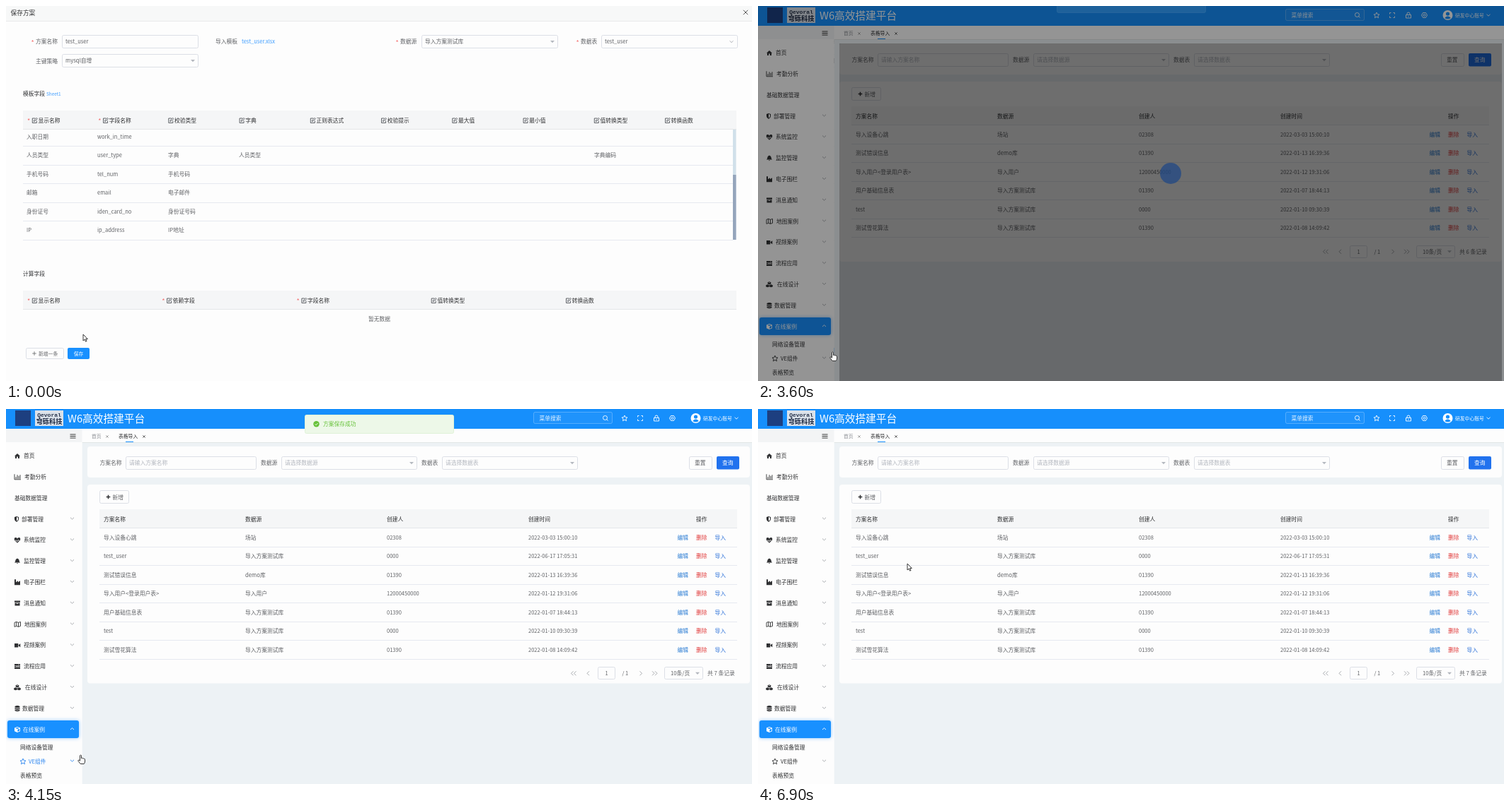
Animation, 1054 px wide and 531 px high, one loop 7000 ms. Source, as an HTML page with a canvas:

```html
<!DOCTYPE html>
<html lang="zh-CN">
<head>
<meta charset="utf-8">
<style>
html, body { margin: 0; width: 100%; height: 100%; overflow: hidden; background: #fdfdfd; }
canvas { display: block; }
</style>
</head>
<body>
<canvas id="stage" width="1054" height="531"></canvas>
<script>
const ctx = document.getElementById('stage').getContext('2d');
const FONT = '"Noto Sans CJK SC", "Noto Sans CJK", "Noto Sans", sans-serif';
const LOOP = 7000, PAGE_SWITCH = 3600, LOADED = 3900;
const INK = '#606266', DARK = '#303133', BLUE = '#1890ff', LINE = '#e6e9f0', BORDER = '#dcdfe6', PAPER = '#fdfdfd', HEAD = '#f5f6f7';

const clamp = v => Math.max(0, Math.min(1, v));
const easeOut = v => 1 - (1 - v) ** 2;

// y is the optical middle of the line of text
function text(s, x, y, color = INK, size = 0, weight = 400, align = 'left', family = FONT) {
  size = size || (/[^\x00-\xff]/.test(s) ? 7.75 : 7.5);
  ctx.font = `${weight} ${size}px ${family}`;
  ctx.textAlign = align;
  ctx.fillStyle = color;
  ctx.fillText(s, x, y + size * .38);
}

function rect(x1, y1, x2, y2, fill, radius = 0, stroke) {
  ctx.beginPath();
  const o = stroke ? .5 : 0;
  ctx.roundRect(x1 + o, y1 + o, x2 - x1 - 2 * o, y2 - y1 - 2 * o, radius);
  if (fill) { ctx.fillStyle = fill; ctx.fill(); }
  if (stroke) { ctx.strokeStyle = stroke; ctx.lineWidth = 1; ctx.stroke(); }
}

function circle(x, y, r, fill) {
  ctx.beginPath();
  ctx.arc(x, y, r, 0, 7);
  ctx.fillStyle = fill;
  ctx.fill();
}

// Strokes (or fills) an SVG path placed at x, y
function path(d, x, y, { stroke, fill, width = .9 }) {
  const shape = new Path2D(d);
  ctx.save();
  ctx.translate(x, y);
  if (fill) { ctx.fillStyle = fill; ctx.fill(shape, 'evenodd'); }
  if (stroke) { ctx.strokeStyle = stroke; ctx.lineWidth = width; ctx.stroke(shape); }
  ctx.restore();
}

const hline = (x1, x2, y, color = LINE) => rect(x1, y, x2, y + 1, color);
const chevron = (x, y, color = '#a8abb2', up = false) =>
  path(up ? 'M-2.5 1.2L0-1.2L2.5 1.2' : 'M-2.5-1.2L0 1.2L2.5-1.2', x, y, { stroke: color });
const triangle = (x, y) => path('M-3-1.5H3L0 1.7Z', x, y, { fill: '#b4b8bf' });
const cross = (x, y, r, color) => path(`M${-r} ${-r}L${r} ${r}M${r} ${-r}L${-r} ${r}`, x, y, { stroke: color });
const plus = (x, y, width, color) => path('M-2.8 0H2.8M0-2.8V2.8', x, y, { stroke: color, width });
const star = (x, y, color) => path('M0-4L1.2-1.3L4-1L1.9 .9L2.5 3.8L0 2.3L-2.5 3.8L-1.9 .9L-4-1L-1.2-1.3Z', x, y, { stroke: color });
const asterisk = (x, y) => text('*', x, y + 1, '#f56c6c', 9);

function field(x1, x2, y1, y2, value, color = INK, arrow) {
  rect(x1, y1, x2, y2, PAPER, 2, BORDER);
  text(value, x1 + 5, (y1 + y2) / 2, color);
  if (arrow) arrow(x2 - 8, (y1 + y2) / 2);
}

function editHeading(x, y, label, required) {
  if (required) { asterisk(x, y); x += 7; }
  path('M4 -3H0V3.5H6V.5M2 1.5L2.4-.2L5.8-3.6L7-2.4L3.6 1Z', x + .3, y, { stroke: '#505358' });
  text(label, x + 8.5, y, DARK, 0, 500);
}

const templateHeadings = ['显示名称', '字段名称', '校验类型', '字典', '正则表达式', '校验提示', '最大值', '最小值', '值转换类型', '转换函数'];
const templateRows = [
  ['入职日期', 'work_in_time'], ['人员类型', 'user_type', '字典', '人员类型', '字典编码'],
  ['手机号码', 'tel_num', '手机号码'], ['邮箱', 'email', '电子邮件'],
  ['身份证号', 'iden_card_no', '身份证号码'], ['IP', 'ip_address', 'IP地址']];
const computedHeadings = ['显示名称', '依赖字段', '字段名称', '值转换类型', '转换函数'];

function drawForm() {
  rect(0, 0, 1054, 531, PAPER);
  rect(0, 0, 1054, 21, '#f7f8f8');
  hline(0, 1054, 21, '#e9eaeb');
  text('保存方案', 6.5, 10, DARK, 8.7);
  cross(1045, 9, 3.2, '#444');

  for (const [x, label, required, y = 50.5] of [[42, '方案名称', 1], [296, '导入模板'], [557, '数据源', 1], [812, '数据表', 1], [42, '主键策略', 0, 78.5]]) {
    if (required) asterisk(x - 6.5, y);
    text(label, x, y);
  }
  field(79, 272, 41, 60, 'test_user');
  text('test_user.xlsx', 333, 50.5, '#409eff');
  field(587, 780, 41, 60, '导入方案测试库', INK, triangle);
  field(841, 1034, 41, 60, 'test_user', INK, (x, y) => chevron(x - 1, y));
  field(79, 272, 68, 87, 'mysql自增', INK, triangle);

  text('模板字段', 24, 124, DARK);
  text('Sheet1', 57, 124.5, '#409eff', 6.4);
  rect(24, 148, 1032, 175, HEAD);
  hline(24, 1032, 174, '#e4e6e8');
  templateHeadings.forEach((label, i) => editHeading(29 + 100.25 * i + (i < 2), 162, label, i < 2));
  templateRows.forEach((row, i) => {
    row.forEach((cell, j) => text(cell, [29, 129, 229, 329, 831][j], 185 + 26.5 * i));
    hline(24, 1027, Math.round(198 + 26.5 * i));
  });
  rect(1027, 175, 1031.5, 331, '#d1e0ea');
  rect(1027, 239, 1031.5, 331, '#95a5bc');

  text('计算字段', 24, 379, DARK);
  rect(24, 403, 1032, 430, HEAD);
  hline(24, 1032, 429, '#e4e6e8');
  computedHeadings.forEach((label, i) => editHeading(30 + 190.3 * i, 417, label, i < 3));
  text('暂无数据', 512, 443);

  rect(28, 484, 82, 500, PAPER, 2, BORDER);
  plus(40, 492, .8, INK);
  text('新增一条', 46, 492, INK, 6.8);
  rect(87, 484, 118, 500, BLUE, 2);
  text('保存', 95.8, 492, '#fff', 6.8, 500);
}

// Menu: label, text x, icon path, icon is outlined
const menu = [
  ['首页', 25, 'M-4 .3L0-3.5L4 .3H3V3.5H.9V1H-.9V3.5H-3V.3Z'],
  ['考勤分析', 26, 'M-4-4V3.5H5M-2 2.5V0M0 2.5V-3M2 2.5V-1.5M4 2.5V-3', 1],
  ['基础数据管理', 12],
  ['部署管理', 22, 'M-4-3L-1-4L2-3V0Q2 2.5-1 4Q-4 2.5-4 0ZM-1-2.8V2.5Q1 1.5 1 0V-2.2Z'],
  ['系统监控', 25, 'M0 4L-4 0Q-5-4-2-3.6Q-.5-3.4 0-2Q.5-3.4 2-3.6Q5-4 4 0ZM-3 0H-1L0 1.5L1-1L1.6 0H3V.7H1.3L.9 .4L0 2.8L-1.3 .7H-3Z'],
  ['监控管理', 25, 'M-4 2Q-2.5 .5-2.6-1.5Q-2-3.4 0-4Q2-3.4 2.6-1.5Q2.5 .5 4 2ZM-1 2.8H1Q0 4.5-1 2.8Z'],
  ['电子围栏', 25, 'M-4-4H-2V0L1-2V0L4-2V4H-4Z'],
  ['消息通知', 25, 'M-4-3.5H4V-1.3H-4ZM-3.5-.7H3.5V3.5H-3.5ZM-1.3 .2V1H1.3V.2Z'],
  ['地图案例', 26, 'M-4-2.5L-1.3-3.5L1.5-2.5L4.5-3.5V2.5L1.5 3.5L-1.3 2.5L-4 3.5ZM-1.3-3.5V2.5M1.5-2.5V3.5', 1],
  ['视频案例', 25, 'M-4-2.7H1.3V2.7H-4ZM1.8-.8L4.3-2.5V2.5L1.8 .8Z'],
  ['流程应用', 25, 'M-4-3.5H4V-1.5H-4ZM-4-.9H4V1H-4ZM-4 1.6H4V3.5H-4ZM1-2.8V-2.2H3V-2.8ZM-2-.2V.3H3V-.2Z'],
  ['在线设计', 27, 'M0-4L2.3-3V-.7L0 .3L-2.3-.7V-3ZM-2.4 0L-.2 1V3.2L-2.4 4L-4.8 3.2V1ZM2.4 0L4.8 1V3.2L2.4 4L.2 3.2V1ZM-1.2-2.5L0-2L1.2-2.5L0-3Z'],
  ['数据管理', 23, 'M-3.5-3Q0-5 3.5-3V-1.5Q0 0-3.5-1.5ZM-3.5-.8Q0 .8 3.5-.8V.9Q0 2.5-3.5 .9ZM-3.5 1.6Q0 3.2 3.5 1.6V3.2Q0 5-3.5 3.2Z'],
  ['在线案例', 24, 'M0-4L4-2.3V2.3L0 4L-4 2.3V-2.3ZM-2.8-2L0-.8L2.8-2L0-3ZM.4 0V3L3.2 1.7V-1.2Z']];

function drawSidebar(hovered) {
  rect(0, 28, 107.5, 531, PAPER);
  rect(0, 28, 107.5, 47, '#f3f4f5');
  path('M-4-2.5H4M-4 0H4M-4 2.5H4', 94.5, 38.5, { stroke: '#333', width: 1.2 });
  ctx.save();
  ctx.shadowColor = 'rgba(24,144,255,.5)';
  ctx.shadowBlur = 5;
  rect(2, 441, 103, 466, BLUE, 3);
  ctx.restore();
  menu.forEach(([label, x, icon, outlined], i) => {
    const y = 66.5 + 29.8 * i, active = i === 13, color = active ? '#fff' : DARK;
    if (icon) path(icon, 16, y, outlined ? { stroke: color } : { fill: color });
    text(label, x, y - .3, color);
    if (i > 2) chevron(93.5, y - 1, active ? '#fff' : '#a0a3a8', active);
  });
  const color = hovered ? '#2b85f0' : DARK;
  text('网络设备管理', 20, 479, DARK);
  star(24, 499, color);
  text('VE组件', 32, 499, color);
  chevron(93.5, 498, hovered ? '#2b85f0' : '#a0a3a8');
  text('表格预览', 20, 519, DARK);
}

function drawTopBar() {
  rect(0, 0, 1054, 28, '#168ffc');
  rect(13, 2, 35, 24, '#1d3f80');
  rect(41, 2, 81, 24, '#dbe2ea');
  text('Qevoral', 61, 8, '#26324a', 8, 700, 'center', '"Liberation Mono", monospace');
  text('穹砾科技', 61, 18, '#1b2740', 9.2, 700, 'center');
  text('W6高效搭建平台', 87, 13.5, '#fff', 14.7);
  rect(745, 4, 857, 21, 'rgba(255,255,255,.04)', 2, 'rgba(255,255,255,.25)');
  text('菜单搜索', 753.5, 13, '#e8f4ff');
  const white = { stroke: '#fff' };
  path('M3 0A3 3 0 1 1-3 0A3 3 0 1 1 3 0M2.2 2.2L4 4', 846.5, 12.5, white);
  star(874, 13, '#fff');
  path('M-3.5-1.5V-3.5H-1.5M1.5-3.5H3.5V-1.5M3.5 1.5V3.5H1.5M-1.5 3.5H-3.5V1.5', 896, 13, white);
  path('M-3.5-.5H3.5V4H-3.5ZM-2-.5V-2Q-2-4 0-4Q2-4 2-2V-.5M0 1V2.5', 919, 13, white);
  path('M-2-3.5H2L4 0L2 3.5H-2L-4 0ZM1.5 0A1.5 1.5 0 1 1-1.5 0A1.5 1.5 0 1 1 1.5 0', 941.5, 13, white);
  circle(974.5, 13, 7, '#fff');
  circle(974.5, 11, 2.6, '#168ffc');
  path('M-4.3 4Q0-.8 4.3 4Q0 7-4.3 4Z', 974.5, 13, { fill: '#168ffc' });
  text('研发中心账号', 985, 13, '#fff', 6.8);
  chevron(1032, 13, '#fff');

  rect(107.5, 28, 1054, 47, PAPER);
  hline(107.5, 1054, 47, '#e2e7e6');
  text('首页', 121, 38.5, '#8a8d93', 6.8);
  cross(143, 39, 1.7, '#999');
  text('表格导入', 159, 38.5, DARK, 6.8);
  cross(195, 39, 1.7, '#555');
  hline(169, 180, 46, BLUE);
}

const schemes = [
  ['导入设备心跳', '场站', '02308', '2022-03-03 15:00:10'],
  ['test_user', '导入方案测试库', '0000', '2022-06-17 17:05:31'],
  ['测试错误信息', 'demo库', '01390', '2022-01-13 16:39:36'],
  ['导入用户<登录用户表>', '导入用户', '12000450000', '2022-01-12 19:31:06'],
  ['用户基础信息表', '导入方案测试库', '01390', '2022-01-07 18:44:13'],
  ['test', '导入方案测试库', '0000', '2022-01-10 09:30:39'],
  ['测试雪花算法', '导入方案测试库', '01390', '2022-01-08 14:09:42']];

function drawList(rows) {
  const hint = '#b2b6be', columns = [138, 338, 538, 738, 975];
  rect(107.5, 48, 1054, 531, '#edf2f5');
  rect(115, 53, 1051, 97, PAPER, 4);
  text('方案名称', 132.5, 76.5);
  field(169, 354, 67, 86, '请输入方案名称', hint);
  text('数据源', 360, 76.5);
  field(389, 581, 67, 86, '请选择数据源', hint, triangle);
  text('数据表', 587, 76.5);
  field(616, 808, 67, 86, '请选择数据表', hint, triangle);
  rect(965, 67, 998, 86, PAPER, 2, BORDER);
  text('重置', 973, 76.5);
  rect(1004, 67, 1036, 85.5, '#2172ee', 2);
  text('查询', 1012, 76.5, '#fff');

  const pagerY = 188.5 + 26.5 * rows.length;
  rect(115, 107, 1051, pagerY + 14.5, PAPER, 4);
  rect(132, 115, 174, 134, PAPER, 2, BORDER);
  plus(144.5, 124.5, 1.5, DARK);
  text('新增', 150.5, 125);
  rect(132, 142, 1033, 168, HEAD);
  hline(132, 1033, 168, '#e4e7eb');
  ['方案名称', '数据源', '创建人', '创建时间', '操作'].forEach((s, i) => text(s, columns[i], 156, DARK, 0, 500));
  rows.forEach((row, i) => {
    const y = 182 + 26.5 * i;
    row.forEach((cell, j) => text(cell, columns[j], y));
    text('编辑', 948.5, y, '#2b7cd3');
    text('删除', 975, y, '#e03a3a');
    text('导入', 1001.5, y, '#2b70d8');
    hline(132, 1033, Math.round(y + 12.5));
  });

  const y = pagerY + .3, gray = { stroke: '#a0a3a8' };
  path('M0-3L-3 0L0 3M4-3L1 0L4 3', 801.5, y, gray);
  path('M1.5-3L-1.5 0L1.5 3', 822.5, y, gray);
  rect(836, Math.round(y - 9), 861, Math.round(y + 9), PAPER, 2, BORDER);
  text('1', 848.5, y, INK, 0, 400, 'center');
  text('/ 1', 870.5, y);
  path('M-1.5-3L1.5 0L-1.5 3', 897, y, gray);
  path('M-4-3L-1 0L-4 3M0-3L3 0L0 3', 917, y, gray);
  rect(930, Math.round(y - 9), 985, Math.round(y + 9), PAPER, 2, BORDER);
  text('10条/页', 939, y);
  triangle(977, y);
  text(`共 ${rows.length} 条记录`, 991, y);
}

// Loading veil over the content, and the dialog's fading veil over the whole page
function drawMasks(t) {
  if (t < LOADED) {
    rect(115, 53, 1051, 531, 'rgba(0,0,0,.26)');
    circle(583, 237, 15, 'rgba(62,126,222,.8)');
  }
  const dim = .42 * clamp(1 - (t - PAGE_SWITCH) / 125);
  rect(0, 0, 1054, 531, `rgba(0,0,0,${dim})`);
}

function drawMessage(t) {
  const leaving = clamp((t - 6590) / 300);
  const shown = easeOut(clamp((t - 3590) / 300)) * (1 - easeOut(leaving));
  if (!shown) return;
  ctx.save();
  ctx.globalAlpha = clamp((t - 3590) / 150) * (1 - leaving);
  ctx.translate(0, -27 * (1 - shown));
  rect(422, 8, 633, 35, '#edf8e8', 2, '#e0f2d8');
  circle(438.5, 21.3, 4.2, '#67c23a');
  path('M-2 0L-.5 1.5L2-1.3', 438.5, 21.3, { stroke: '#fff' });
  text('方案保存成功', 448, 21.5, '#67c23a');
  ctx.restore();
}

// Pointer hot spot: time, x, y
const track = [
  [0, 109, 465], [50, 109, 465], [1500, 101, 483], [1600, 102, 485], [1700, 105.5, 490], [4350, 105.5, 490],
  [5450, 167, 236], [5800, 173, 227], [6800, 211, 219], [7000, 211, 219]];

function pointerAt(t) {
  const i = track.findIndex(p => p[0] > t);
  const [t0, x0, y0] = track[i - 1], [t1, x1, y1] = track[i];
  const k = (t - t0) / (t1 - t0), e = k * k * (3 - 2 * k);
  return [x0 + (x1 - x0) * e, y0 + (y1 - y0) * e];
}

function drawPointer(x, y, hand) {
  const d = hand
    ? 'M-1 6V.6Q0-.6 1 .6V4.5Q2.3 3.7 2.9 4.9Q4.2 4.2 4.7 5.3Q6 5 6 6.3V9Q6 11 4.7 12.5H-.3L-3.6 8.3Q-3.8 6.6-2.2 7.2L-1 8.2Z'
    : 'M0 0V9L2.1 7.1L3.5 10.2L5 9.5L3.6 6.5H6.3Z';
  path(d, x, y, { fill: '#fff', stroke: '#222' });
}

function draw(t) {
  const [x, y] = pointerAt(t);
  let hand;
  if (t < PAGE_SWITCH) {
    drawForm();
    hand = x > 87 && x < 118 && y > 484 && y < 500;
  } else {
    hand = x < 107.5;
    drawList(t < LOADED ? schemes.filter((_, i) => i !== 1) : schemes);
    drawTopBar();
    drawSidebar(t > LOADED && hand && y > 488);
    drawMasks(t);
    drawMessage(t);
  }
  drawPointer(x, y, hand);
}

const start = performance.now();
function tick() {
  draw((performance.now() - start) % LOOP);
  requestAnimationFrame(tick);
}
tick();
</script>
</body>
</html>
```
